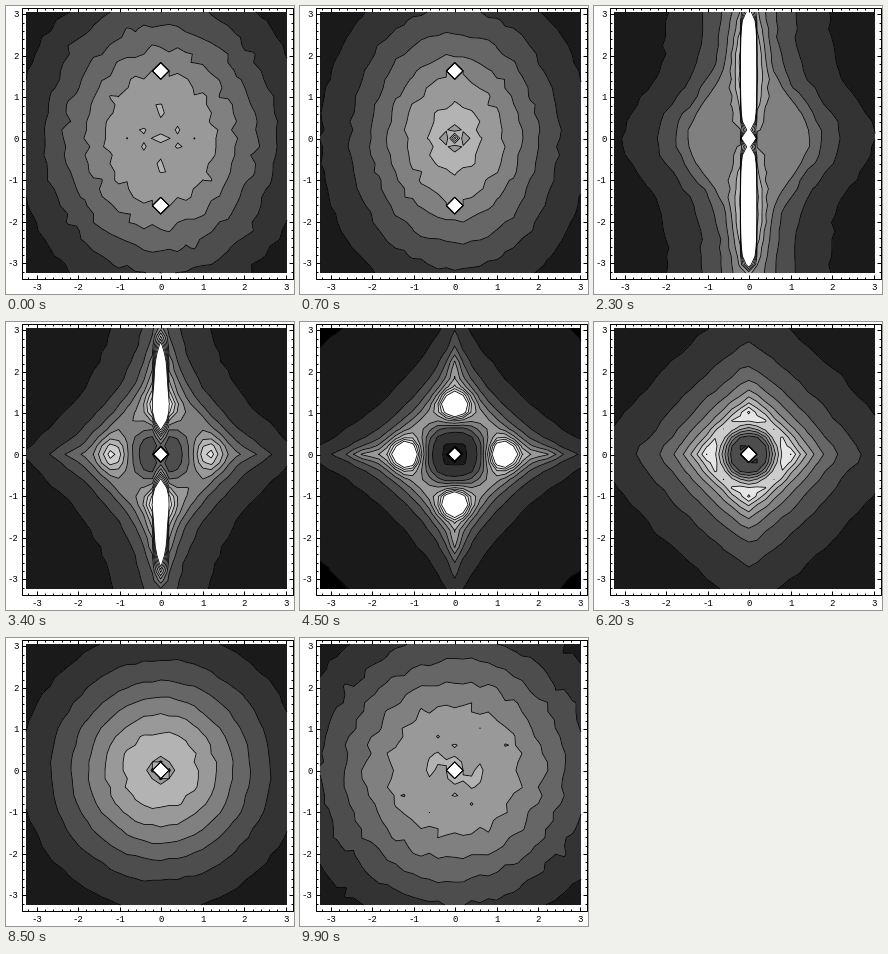
These frames come from a looping animation (288 by 288 pixels, 10 s). A matplotlib script:

```python
import numpy as np
import matplotlib.pyplot as plt
from matplotlib.animation import FuncAnimation

SIZE, N, FRAMES, STEP = 288, 32, 100, 100
UNIT = 41.5                      # pixels per axis unit
CX, CY = 155.2, 132.8            # pixel position of the origin
CELL = 261 / (N - 1)
MID = N // 2

# wave vectors of a 32 x 32 lattice
k = np.arange(N) - MID
X, Y = np.meshgrid(k * CELL / UNIT, k * CELL / UNIT)
R = np.hypot(X, Y)


def norm(p):
    return (np.abs(X) ** p + np.abs(Y) ** p) ** (1 / p)


def hill(rho, top, width, q):
    """Lorentzian-like peak; width is the half-height radius."""
    return top / (1 + (rho / width) ** q)


def bowl(low, rise, width, q):
    """Round hole that climbs from low by rise."""
    return low + rise - hill(R, rise, width, q)


def blob(x0, y0, s):
    return np.exp(-((X - x0) ** 2 + (Y - y0) ** 2) / (2 * s * s))


def dip(v):
    return v * (1 - .75 * np.exp(-(R / .2) ** 2))


def spike(v, height, *rows):
    for row in rows:
        v[MID + row, MID] = height
    return v


def hot_ellipse():
    v = hill(np.hypot(X, Y / 1.18), 6.9, 2.55, 2.86)
    return spike(v, 300, -8, 8)


def ellipse():
    v = dip(hill(np.hypot(X, Y / 1.32), 7.9, 1.82, 2.22))
    return spike(spike(v, 300, -8, 8), 18, 0)


def column():
    rho = np.abs(X) - 1.1 * np.exp(-(Y / 1.3) ** 2)
    wave = np.abs(np.sin(2 * np.pi * k / N))
    v = np.minimum(hill(np.maximum(rho, 0), 7, .85, 1.1), 5.6)
    v += 4 * np.exp(-(X / .3) ** 2) * wave[:, None]
    v[:, MID] = 6 + 60 * wave ** 1.5
    return spike(v, 60, 0)


def star():
    rho = np.maximum(norm(.75), .1)
    v = np.minimum(7.3 / rho + hill(rho, 3.2, 2.45, 8), bowl(1.9, 5.5, .78, 5))
    for s in (-1, 1):
        v += 9 * (blob(1.17 * s, 0, .22) + blob(0, 1.17 * s, .22))
        v += .7 * (blob(2.25 * s, 0, .18) + blob(0, 2.15 * s, .18))
    return spike(v, 40, 0)


def ring():
    rho = np.maximum(norm(1.15), .1)
    v = np.minimum(10.4 * rho ** -1.25, bowl(3, 7.5, .62, 6))
    return spike(v, 200, 0)


def disc():
    return spike(dip(hill(R, 7.8, 2.2, 2.49)), 300, 0)


def hot_disc():
    return spike(hill(R, 6.9, 2.95, 3), 300, 0)


# time in ms, field, relative noise
KEYS = [(0, hot_ellipse, .03), (1400, ellipse, .012), (2300, column, .018),
        (4500, star, .01), (6200, ring, .012), (8500, disc, .012),
        (9900, hot_disc, .03)]
times, makers, sigmas = zip(*KEYS)
logs = [np.log(make()) for make in makers]


def field(i):
    """Geometric blend of the neighbouring key fields plus seeded noise."""
    t = i * STEP
    j = min(np.searchsorted(times, t, side="right"), len(KEYS) - 1)
    f = (t - times[j - 1]) / (times[j] - times[j - 1])
    v = np.exp((1 - f) * logs[j - 1] + f * logs[j])
    n = np.random.default_rng(100 + i).normal(size=(N, N))
    n = (n + np.roll(n[::-1, ::-1], 1, (0, 1))) / np.sqrt(2)   # k -> -k symmetry
    return v * (1 + np.interp(t, times, sigmas) * n)


fig = plt.figure(figsize=(4, 4), dpi=72, facecolor="white")
ax = fig.add_axes([0, 0, 1, 1])
ax.set_xlim(0, SIZE)
ax.set_ylim(SIZE, 0)
ax.axis("off")

LEFT, RIGHT, TOP, BOTTOM = 15.5, 286.5, 1.5, 272.5


def line(x, y):
    ax.plot(x, y, color="black", lw=1, solid_capstyle="butt", snap=True)


line([LEFT, RIGHT, RIGHT, LEFT, LEFT], [TOP, TOP, BOTTOM, BOTTOM, TOP])
for m in range(-16, 16):
    size = 4 if m % 5 == 0 else 2
    px, py = CX + m / 5 * UNIT, CY - m / 5 * UNIT
    if LEFT < px < RIGHT:
        line([px, px], [BOTTOM, BOTTOM - size])
        line([px, px], [TOP, TOP + size])
    if TOP < py < BOTTOM:
        line([LEFT, LEFT + size], [py, py])
        line([RIGHT, RIGHT - size], [py, py])

font = dict(family="Liberation Mono", size=9, color="black", va="center_baseline")
for m in range(-3, 4):
    ax.text(CX + m * UNIT, 281, str(m), ha="center", **font)
    ax.text(12.5, CY - .7 - m * UNIT, str(m), ha="right", **font)

gx = 20 + CELL * np.arange(N)
gy = 267 - CELL * np.arange(N)
LEVELS = np.arange(1, 11)
BANDS = np.r_[-1e4, LEVELS, 1e6]
GREYS = [str(g / 10) for g in range(11)]
shown = []


def update(i):
    while shown:
        shown.pop().remove()
    v = field(i)
    shown.append(ax.contourf(gx, gy, v, levels=BANDS, colors=GREYS,
                             antialiased=False, zorder=1))
    shown.append(ax.contour(gx, gy, v, levels=LEVELS, colors="black",
                            linewidths=.8, antialiased=True, zorder=1.5))
    return shown


anim = FuncAnimation(fig, update, frames=FRAMES, interval=STEP,
                     repeat=True, repeat_delay=0, blit=False)
plt.show()
```
